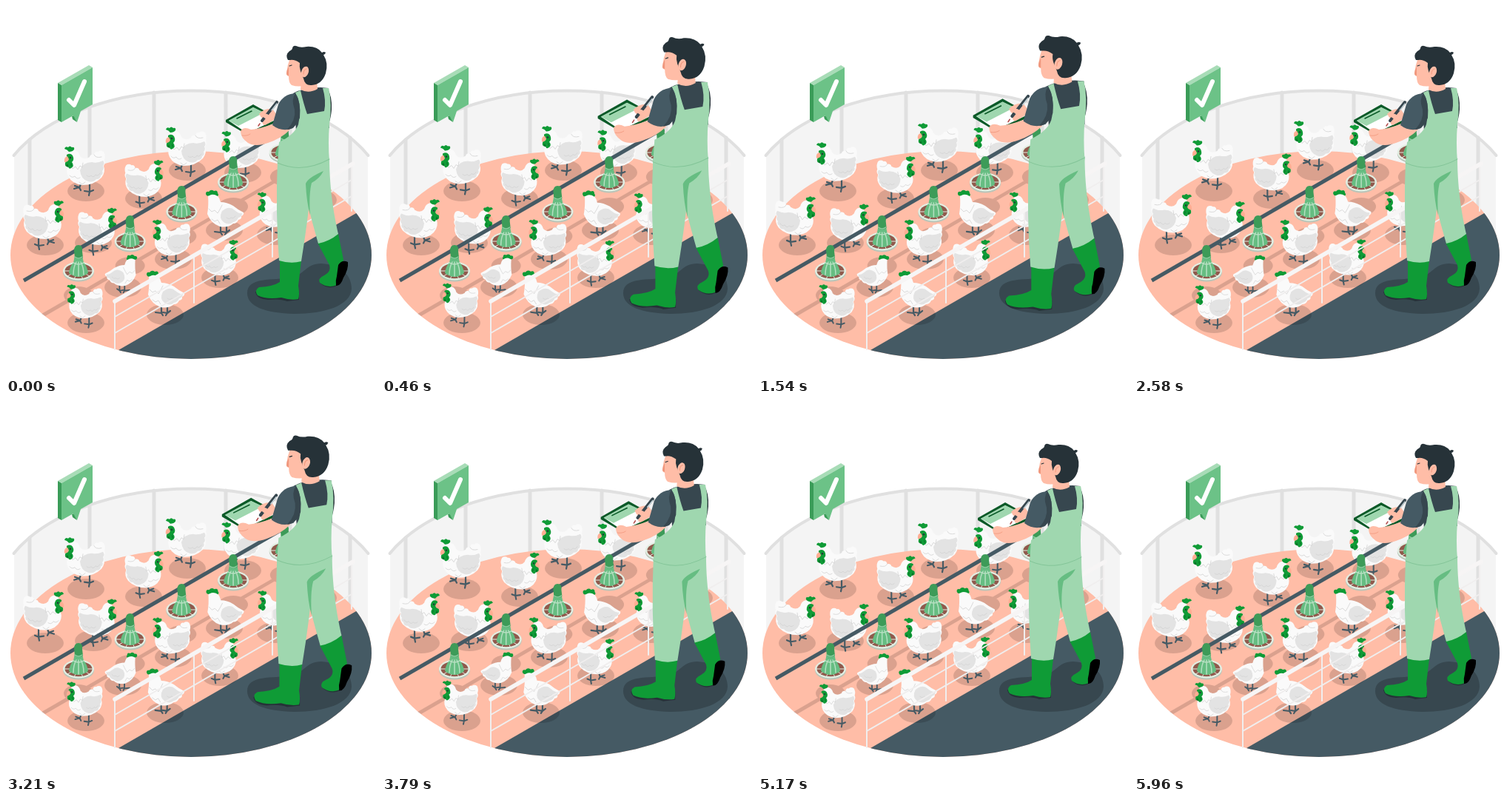
These frames come from a looping animation (500x500 px, 6 s). An HTML page:

```html
<!DOCTYPE html>
<html lang="en">
<head>
<meta charset="utf-8">
<title>Poultry farm check</title>
<style>
html, body { margin: 0; width: 100%; height: 100%; overflow: hidden; background: #fff; }
svg { display: block; width: 100vw; height: 100vh; }
.line { fill: none; stroke-linecap: round; stroke-linejoin: round; }
</style>
</head>
<body>
<svg viewBox="0 0 500 500">
<defs>
  <clipPath id="disc"><ellipse cx="250" cy="336.5" rx="244" ry="140.5"/></clipPath>

  <g id="hen">
    <path class="line" stroke="#455a64" stroke-width="2.2" d="M-5 18L-8 26M-15 27L-8 25L-6 29M-8 25L-14 23M6 20V31M-1 30L6 31L5 36M6 31L11 29"/>
    <path fill="#fafafa" d="M-23 -18Q-20 -26 -14 -25Q-9 -24 -7 -17Q-2 -11 6 -16Q7 -20 12 -19Q13 -24 17 -23Q21 -26 25 -23Q28 -18 26 -12Q28 -8 25 -4Q28 4 22 12Q12 22 -4 22Q-18 20 -23 10Q-27 2 -22 -7Z"/>
    <path fill="#e3e3e3" d="M-7 2Q-3 -9 9 -9Q16 -7 24 -11Q27 -7 24 -4Q26 0 23 3Q25 7 21 9Q21 14 15 14Q11 19 4 17Q-6 14 -7 2Z"/>
    <path class="line" stroke="#d2d2d2" stroke-width=".8" d="M-20 -4L-17 0L-13 -3L-10 1L-7 -4L-4 -2L-3 -8M2 9Q5 12 8 9Q11 13 14 8Q17 11 20 6M12 -19Q14 -14 22 -16M-21 9Q-18 13 -14 10Q-11 15 -7 12M-8 18L-4 21L0 18"/>
    <path fill="#0f9b36" d="M-28 -27Q-27 -31 -23 -29Q-21 -32 -18 -29Q-14 -30 -15 -26Q-17 -23 -22 -23Q-24 -26 -28 -27Z"/>
    <path fill="#0f9b36" d="M-25 -19Q-20 -22 -17 -18Q-14 -12 -18 -9Q-14 -4 -19 -1Q-22 1 -23 -3Q-28 -2 -27 -8Q-26 -10 -25 -11Z"/>
    <path fill="#ffad92" d="M-24 -17Q-29 -16 -28 -9Q-23 -9 -22 -13Z"/>
    <path fill="#087029" d="M-24 -7Q-22 -2 -23 -2Q-27 -4 -24 -7ZM-20 -8Q-17 -5 -19 -3Z"/>
    <circle cx="-20" cy="-15" r="1.2" fill="#263238"/>
  </g>

  <g id="backHen">
    <path class="line" stroke="#455a64" stroke-width="2.2" d="M-5 18V28M-13 27L-5 28L-3 31M3 18V28M-3 27L3 28L1 31M3 28L7 25"/>
    <path fill="#fafafa" d="M-22 -22Q-16 -28 -10 -23Q-6 -18 -5 -13Q3 -13 12 -8Q18 -3 26 1Q27 4 23 6Q24 10 19 11Q17 16 12 16Q5 22 -6 20Q-18 16 -23 3Q-21 -8 -22 -22Z"/>
    <path fill="#e3e3e3" d="M-3 -1Q7 -9 14 -2Q20 3 24 2Q24 7 19 8Q17 13 12 14Q6 19 -1 14Q-8 9 -3 -1Z"/>
    <path class="line" stroke="#d2d2d2" stroke-width=".8" d="M-21 -4L-17 0L-13 -2L-9 2L-6 -3L-3 -9M3 8Q6 11 9 8Q12 10 15 6M-17 10L-13 13L-9 11L-6 16"/>
    <path fill="#0f9b36" d="M-25 -24Q-25 -28 -21 -27Q-18 -31 -14 -28Q-9 -30 -9 -25Q-7 -23 -9 -21Q-15 -25 -20 -22Q-24 -20 -25 -24Z"/>
  </g>

  <g id="feeder">
    <ellipse cy="3" rx="21" ry="12.5" fill="#b9c5b9"/>
    <ellipse cy="1" rx="21" ry="12.5" fill="#e2efe3"/>
    <ellipse cy="1" rx="18.5" ry="10.3" fill="#90594c"/>
    <path class="line" stroke="#e2efe3" stroke-width="1" d="M-20 1H20M-15 8L0 0L15 8M-6 12L0 0L6 12"/>
    <path fill="#66bd82" d="M-13 4Q-12 -5 -7 -10L-5 -20H5L7 -10Q12 -5 13 4Q0 14 -13 4Z"/>
    <path class="line" stroke="#b5dfc1" stroke-width="1.5" d="M-3 -11Q-7 -4 -7 6M3 -11Q7 -4 7 6M0 -11V8M-7 -10Q0 -6 7 -10"/>
    <path fill="#3d9b58" d="M-5 -17L-6 -26Q-6 -34 0 -34Q6 -34 5 -26L6 -17Q0 -13 -5 -17Z"/>
    <path class="line" stroke="#8ccda0" stroke-width="1.6" d="M-5 -18Q0 -14 5 -18"/>
  </g>
</defs>

<path fill="#f4f4f4" d="M11 202A265 153 0 0 1 489 202V340H11Z"/>
<g class="line" stroke="#e0e0e0">
  <path stroke-width="5" d="M32 181V300M113 137V240M200 117V210M297 117V210M384 136V230M465 178V300"/>
  <path stroke-width="4" d="M10.500 202A265 153 0 0 1 489.500 202"/>
</g>

<g clip-path="url(#disc)">
  <path fill="#ffbda7" d="M0 190H500V480H0Z"/>
  <path fill="#455a64" d="M126 480L500 264.500V480Z"/>
</g>
<g id="shade" fill="#000" opacity=".14"></g>
<path fill="#37474f" d="M326 388C326 366 360 371 385 367C403 364 405 348 426 348C455 350 467 365 467 382C466 405 430 416 390 416C350 415 326 406 326 388Z"/>

<g id="floaters"></g>
<path class="line" stroke="#455a64" stroke-width="5" style="stroke-linecap:butt" d="M24 371L380 165.500"/>
<g id="feeders"></g>
<g id="swayers"></g>

<g class="line" stroke="#f0eeee">
  <path stroke-width="2" d="M147 399V464M254 340V401M360 279V339M467 215V277M147 420L467 235M147 442L467 257"/>
  <path stroke="#f7f5f5" stroke-width="5.500" d="M147 399L469 213"/>
</g>

<g id="farmer">
  <path fill="#263238" d="M424 374Q435 384 447 378L444 368Z"/>
  <path fill="#0f9b36" d="M421 320Q437 317 449 308L456 343L447 377Q435 382 424 374Q421 368 430 364Q440 359 437 350Z"/>
  <path d="M449 350Q454 342 462 346Q463 356 456 367Q452 379 446 378Q445 371 447 365Z"/>
  <path fill="#9fd7af" d="M403 235L437 205C437 250 444 285 449 308Q437 318 422 321C415 295 408 275 403 235Z"/>
  <path fill="#263238" d="M337 386Q338 396 354 397Q370 395 380 399L396 397V386Z"/>
  <path fill="#0f9b36" d="M370 341Q384 349 399 344L395 378Q397 390 395 396Q385 398 372 394Q352 397 340 391Q335 384 342 380Q361 379 370 373Z"/>
  <path fill="#9fd7af" d="M367 208H437Q429 224 413 238Q408 290 399 345Q385 349 369 344Q364 280 367 208Z"/>
  <path fill="#66bd82" d="M429 223Q408 232 405 240Q406 264 411 283Q409 254 413 239Q424 233 429 223Z"/>

  <path fill="#263238" d="M434 111Q441 122 440 140Q439 152 435 162L428 150Z"/>
  <path fill="#37474f" d="M388 118Q402 110 425 110L436 111L437 165L392 168Z"/>
  <path fill="#ffbda7" d="M399 100H420L421 112Q409 119 398 113Z"/>
  <path fill="#ffbda7" d="M384 70Q380 80 379 91Q379 94 382 95Q382 104 386 107Q396 110 404 107L414 90L402 68Z"/>
  <path fill="#f0987e" d="M382 82Q379 87 379 91Q379 94 382 94Z"/>
  <path class="line" stroke="#263238" stroke-width="1.2" d="M383 81L386 80"/>
  <path fill="#263238" d="M381 73Q377 66 383 61Q387 59 387 57Q388 53 392 54Q398 57 406 55Q420 54 427 63Q430 61 432 63Q431 66 429 66Q436 77 432 91Q427 106 413 107Q404 108 402 98L398 88Q396 82 397 77Q390 72 384 73Z"/>
  <ellipse cx="404" cy="89" rx="4.800" ry="7.500" fill="#ffbda7" transform="rotate(18 404 89)"/>
  <path class="line" stroke="#f0987e" stroke-width="1" d="M402 92Q402 86 406 85"/>

  <path fill="#9fd7af" d="M391 117L398 114Q402 132 407 146L430 142Q433 128 428 111L436 111Q441 132 437 160Q435 185 437 210Q400 227 367 213L369 184Q390 174 395 160Q400 140 391 117Z"/>
  <path class="line" stroke="#83c598" stroke-width="1" d="M367 212Q400 227 437 207"/>

  <path fill="#0b5a28" d="M297 154L334 133L368 152V156L326 174L297 157Z"/>
  <path fill="#fff" d="M301 155L334 137L366 153L326 172Z"/>
  <path fill="#9fd7af" d="M301 155L334 137L349 144L314 162Z"/>
  <path class="line" stroke="#0b5a28" stroke-width="1.500" d="M312 152L332 142"/>
  <path fill="#ffbda7" d="M362 159Q343 166 331 167Q321 162 317 169Q317 178 327 185Q337 191 354 185Q372 179 384 167Z"/>
  <path class="line" stroke="#f0987e" stroke-width=".8" d="M319 175Q326 176 330 173"/>
  <path fill="#ffbda7" d="M342 146Q349 138 360 139L368 150Q358 157 350 161Q345 161 347 153Z"/>
  <path class="line" stroke="#37474f" stroke-width="4" d="M346 155L366 130"/>
  <path class="line" stroke="#dceaf0" stroke-width="1.200" d="M359 141L366 132"/>
  <path class="line" stroke="#b44b4b" stroke-width="1.500" d="M343 159L341 162"/>
  <path fill="#ffbda7" d="M344 147Q351 143 356 148L352 154Q348 149 344 150Z"/>
  <path fill="#455a64" d="M391 118Q375 119 368 133L360 161Q373 171 388 165Q398 154 397 138Q396 124 391 118Z"/>
  <path fill="#37474f" d="M391 118Q385 126 390 140Q392 154 380 167Q391 166 397 151Q399 130 391 118Z"/>
</g>

<path fill="#a8dcb7" d="M70 104L112 80L117 83L75 107Z"/>
<path fill="#3a9c58" d="M70 104L75 107V157L70 154ZM89 149L92 148L96 157L90 153Z"/>
<path fill="#6cc287" d="M75 107L117 83V133L101 142L96 157L91 148L75 157Z"/>
<path class="line" stroke="#fff" stroke-width="6" d="M85 127L92 134L106 102"/>
</svg>

<script>
const LOOP = 6000, BEAT = 3000;
const byId = id => document.getElementById(id);

// Each entry: x, y, scale, and -1 to face right
const place = (shape, [x, y, scale = 1, face = 1]) =>
  `<use href="#${shape}" transform="translate(${x} ${y}) scale(${scale * face} ${scale})"/>`;
const placeAll = (shape, list) => list.map(p => place(shape, p)).join('');

const floaters = [[244, 194], [318, 198, .95], [107, 220], [186, 237, .95, -1],
  [50, 293, 1, -1], [123, 302, .96, -1]];
const hens = [[365, 279, .9], [224, 317, .93], [288, 344, .92, -1], [107, 403, .88]];
const backHens = [[295, 278], [156, 361, .85, -1], [215, 387]];
const feeders = [4, 3, 2, 1, 0].map(i => [98 + i * 69.7, 357 - i * 40]);
const shadows = [[108, 250], [186, 260], [245, 222], [53, 323], [118, 320], [108, 428],
  [215, 417], [158, 380], [289, 367], [226, 342], [320, 225], [364, 309], [295, 303], [422, 262]];

byId('floaters').innerHTML = placeAll('hen', floaters);
byId('feeders').innerHTML = placeAll('feeder', feeders);
byId('swayers').innerHTML = placeAll('backHen', [backHens[0]]) +
  placeAll('hen', hens) + placeAll('backHen', backHens.slice(1));
byId('shade').innerHTML =
  '<path d="M48 416L372 229L376 232L53 419Z"/>' +
  feeders.map(([x, y]) => `<ellipse cx="${x}" cy="${y + 34}" rx="20" ry="12"/>`).join('') +
  shadows.map(([x, y]) => `<ellipse cx="${x}" cy="${y}" rx="25" ry="14"/>`).join('');

// Linear interpolation through [position, value] keys
function keyed(p, keys) {
  const i = keys.findIndex(k => k[0] > p);
  const [a, u] = keys[i - 1], [b, v] = keys[i];
  return u + (v - u) * (p - a) / (b - a);
}
const rise = [[0, 0], [.5, -10], [1, 0]];
const sway = [[0, 0], [.25, 1], [.75, -1], [1, 0]];
const pulse = [[0, 1], [.1, 1.09], [.3, 1], [.4, 1], [.5, 1.09], [.6, 1], [1, 1]];

function draw(now) {
  const p = now % LOOP / LOOP, beat = now % BEAT / BEAT;
  const move = (id, value) => byId(id).setAttribute('transform', value);
  move('floaters', `translate(0 ${keyed(p, rise)})`);
  move('swayers', `rotate(${keyed(beat, sway)} 228 345)`);
  move('farmer', `translate(379 233) scale(${keyed(beat, pulse)}) translate(-379 -233)`);
  requestAnimationFrame(() => draw(performance.now()));
}
draw(performance.now());
</script>
</body>
</html>
```
